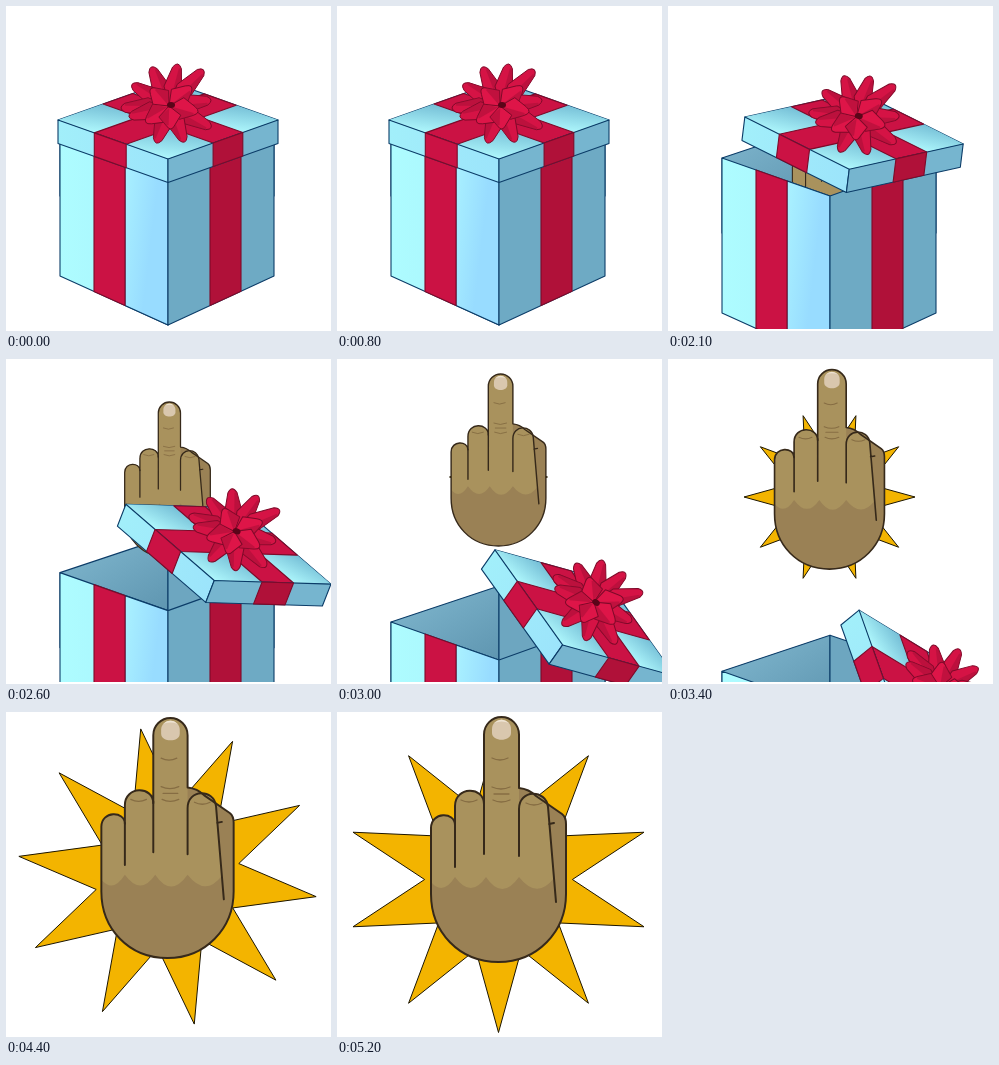
An HTML page that plays this animation: 325x325 px, repeating every 6.2 s.

```html
<!DOCTYPE html>
<html lang="en">
<head>
<meta charset="utf-8">
<title>Gift box surprise</title>
<style>
  html, body { margin: 0; width: 100%; height: 100%; overflow: hidden; background: #fff; }
  svg { display: block; width: 100vw; height: 100vh; }
</style>
</head>
<body>
<svg viewBox="0 0 325 325">
  <defs>
    <clipPath id="stage"><rect width="325" height="323"/></clipPath>
    <linearGradient id="leftFace"><stop stop-color="#aefcff"/><stop offset="1" stop-color="#a6f2fb"/></linearGradient>
    <linearGradient id="midFace" x2="1" y2=".5"><stop stop-color="#aaf2ff"/><stop offset=".7" stop-color="#98dcff"/></linearGradient>
    <linearGradient id="top" x1=".6" y1="0" x2=".3" y2="1"><stop stop-color="#74bdd5"/><stop offset="1" stop-color="#b2fbff"/></linearGradient>
    <linearGradient id="rim"><stop stop-color="#a2effa"/><stop offset="1" stop-color="#9ce4fb"/></linearGradient>
    <linearGradient id="inside" x2=".6" y2="1"><stop stop-color="#82b9d0"/><stop offset="1" stop-color="#5c93ae"/></linearGradient>
  </defs>
  <g clip-path="url(#stage)">
    <g id="back"></g>
    <path id="star" fill="#f3b400" stroke="#1c1500" stroke-width="1"/>
    <g id="hand" stroke-linecap="round" stroke-linejoin="round"></g>
    <g id="front"></g>
    <g id="lid"></g>
  </g>
</svg>
<script>
const $ = id => document.getElementById(id);
const NAVY = '#0b3c68', WINE = '#7d0a29', RED = '#cb1244', DEEP_RED = '#b01139';

const poly = (points, fill, stroke = NAVY) =>
  `<polygon points="${points}" fill="${fill}" stroke="${stroke}" stroke-width="1.1" stroke-linejoin="round"/>`;
const line = (d, color, width) => `<path d="${d}" fill="none" stroke="${color}" stroke-width="${width}"/>`;

// Box
$('back').innerHTML =
  poly('54,115 162,79 162,153 54,190', 'url(#inside)') +
  poly('162,79 268,115 268,190 162,153', '#6da6c0');

$('front').innerHTML =
  poly('54,115 162,153 162,319 54,270', 'url(#leftFace)') +
  poly('119,138 162,153 162,319 119,299.5', 'url(#midFace)') +
  poly('162,153 268,115 268,270 162,319', '#6eaac4') +
  poly('88,127 119,138 119,299.5 88,285.4', RED, WINE) +
  poly('204,138 235,127 235,285.3 204,299.6', DEEP_RED, WINE);

// Lid: u runs left to front corner, v runs left to back corner
const onLid = (u, v, drop = 0) => [52 + 110 * (u + v), 114 + 39 * (u - v) + drop];
const topQuad = (u0, u1, v0, v1) => [onLid(u0, v0), onLid(u1, v0), onLid(u1, v1), onLid(u0, v1)].join(' ');
const leftRim = (a, b) => [onLid(a, 0), onLid(b, 0), onLid(b, 0, 23.5), onLid(a, 0, 23.5)].join(' ');
const rightRim = (a, b) => [onLid(1, a), onLid(1, b), onLid(1, b, 23.5), onLid(1, a, 23.5)].join(' ');

function petal(tx, ty, base, fill = '#de1548') {
  const cx = 163, cy = 100;
  const len = Math.hypot(tx - cx, ty - cy), ux = (tx - cx) / len, uy = (ty - cy) / len;
  const at = (along, side) => `${(cx + ux * along - uy * side).toFixed(1)} ${(cy + uy * along + ux * side).toFixed(1)}`;
  const tip = 4.5, neck = len - 5, wide = len * .42;
  return `<path d="M${at(0, 0)}L${at(wide, -base)}L${at(neck, -tip)}Q${at(len + 3, 0)} ${at(neck, tip)}L${at(wide, base)}Z"
    fill="${fill}" stroke="${WINE}" stroke-width="1" stroke-linejoin="round"/>
    <path d="M${at(2, 0)}L${at(neck, 2)}L${at(neck, tip)}L${at(wide, base)}Z" fill="#a80f37" opacity=".55"/>`;
}

const outer = [[145, 60], [172, 57], [198, 63], [125, 78], [114, 102], [206, 94],
  [206, 122], [179, 137], [150, 138], [122, 111]];
const inner = [[144, 82], [186, 80], [139, 117], [193, 106], [165, 124]];

$('lid').innerHTML =
  poly(topQuad(0, 1, 0, 1), 'url(#top)') +
  poly(topQuad(0, .33, 0, .41), 'url(#top)', 'none') +
  poly(topQuad(.62, 1, 0, .41), 'url(#top)', 'none') +
  poly(topQuad(.62, 1, .68, 1), 'url(#top)', 'none') +
  poly(topQuad(0, 1, .41, .68), RED, WINE) +
  poly(topQuad(.33, .62, 0, 1), RED, WINE) +
  poly(topQuad(.34, .61, .39, .7), RED, 'none') +
  poly(leftRim(0, 1), 'url(#rim)') +
  poly(rightRim(0, 1), '#76b5cf') +
  poly(leftRim(.33, .62), RED, WINE) +
  poly(rightRim(.41, .68), DEEP_RED, WINE) +
  outer.map(([x, y]) => petal(x, y, 9, '#d51345')).join('') +
  inner.map(([x, y]) => petal(x, y, 11)).join('') +
  '<ellipse cx="165" cy="99" rx="4" ry="3" fill="#5a0519"/>';

// Hand
const INK = '#36291a', CREASE = '#866d43';
const fingers = 'V116C94 99.500 118 99.500 118 113V94C118 74 147 74 147 92V22.500A17.500 17.500 0 0 1 182 22.500';
const index = 'M182 97C182 77 209 77 211 95';
const silhouette = `M94 182${fingers}V76Q192 77 199 84L225 102Q229 105 229 112V182C229 220 200 250 161.500 250C122 250 94 220 94 182Z`;

$('hand').innerHTML =
  `<path d="${silhouette}" fill="#9a8155"/>
   <path d="M94 170${fingers}V97C182 77 209 77 211 95L217 166Q200 188 182 165Q165 189 149 165Q134 187 118 165Q106 184 94 170Z" fill="#a9925d"/>` +
  line(silhouette, INK, 2) +
  line(`${index}L219 190M118 112V155M147 90V142M182 97V144M212 112l5 -1`, INK, 2) +
  line('M155 46Q163 50 171 46M155 75Q164 79 173 75M157 82H172M156 88Q164 92 173 88M124 88Q132 92 140 88M189 91Q197 95 205 91', CREASE, 1.3) +
  `<path d="M155 17C155 5 174 5 174 17V21C174 30 155 30 155 21Z" fill="#d9c7ae"/>
   <path d="M157 11Q164.500 4 172 11Q164.500 8 157 11Z" fill="#eee3d2"/>`;

// Motion, measured in 100 ms steps after the lid starts to open
function track(keys, n) {
  if (n <= keys[0][0]) return keys[0][1];
  for (let i = 1; i < keys.length; i++) {
    const [n0, v0] = keys[i - 1], [n1, v1] = keys[i];
    if (n <= n1) return v0 + (v1 - v0) * (n - n0) / (n1 - n0);
  }
  return keys[keys.length - 1][1];
}

const LID_X = [[0, 0], [3, 24], [7, 54], [12, 86], [20, 111], [24, 122]];
const LID_Y = [[0, 0], [1, 1], [3, 10.5], [7, 54], [12, 140], [20, 305], [24, 400]];
const HAND_TOP = [[0, 150], [3, 100], [7, 52], [10, 25], [12, 15], [14, 12], [20, 8], [26, 6], [34, 5]];
const HAND_SIZE = [[0, .5], [3, .55], [12, .702], [20, .926], [26, .98], [34, 1]];
const STAR_Y = [[0, 190], [7, 140], [12, 118], [20, 158], [26, 164.5], [34, 167.5]];
const STAR_R = [[7, 10], [12, 49], [20, 122], [21, 130], [24, 147], [26, 150], [34, 153]];
const STAR_TURN = [[20, 0], [34, 18]];

function starPath(cx, cy, r, turn) {
  const points = Array.from({ length: 20 }, (_, i) => {
    const a = (turn + i * 18) * Math.PI / 180, d = i % 2 ? r * .483 : r;
    return `${(cx + d * Math.cos(a)).toFixed(2)} ${(cy + d * Math.sin(a)).toFixed(2)}`;
  });
  return `M${points.join('L')}Z`;
}

// Two hops, each lasting seven steps
function hop(step) {
  const k = step >= 10 ? step - 10 : step - 1;
  if (k <= 0 || k >= 7) return '';
  const up = -28 * Math.sin(Math.PI * k / 7), tilt = -2.7 * Math.sin(2 * Math.PI * k / 7);
  return `translate(0 ${up}) rotate(${tilt} 162 319) `;
}

function draw(ms) {
  const step = Math.floor(ms / 100), n = Math.min(34, Math.max(0, step - 18));
  const jump = hop(step), fall = `${jump}translate(0 ${12.33 * n})`;
  $('back').setAttribute('transform', fall);
  $('front').setAttribute('transform', fall);
  $('lid').setAttribute('transform', `${jump}translate(${162 + track(LID_X, n)} ${114 + track(LID_Y, n)}) ` +
    `rotate(${2.14 * n + .065 * n * n}) translate(-162 -114)`);

  const visible = n > 0 ? 'visible' : 'hidden';
  $('hand').setAttribute('visibility', visible);
  $('star').setAttribute('visibility', visible);
  $('hand').setAttribute('transform',
    `translate(161.5 ${track(HAND_TOP, n)}) scale(${track(HAND_SIZE, n)}) translate(-161.5 -5)`);
  $('star').setAttribute('d', starPath(161.5, track(STAR_Y, n), track(STAR_R, n), track(STAR_TURN, n)));
}

const start = performance.now();
function tick() {
  draw((performance.now() - start) % 6200);
  requestAnimationFrame(tick);
}
tick();
</script>
</body>
</html>
```
